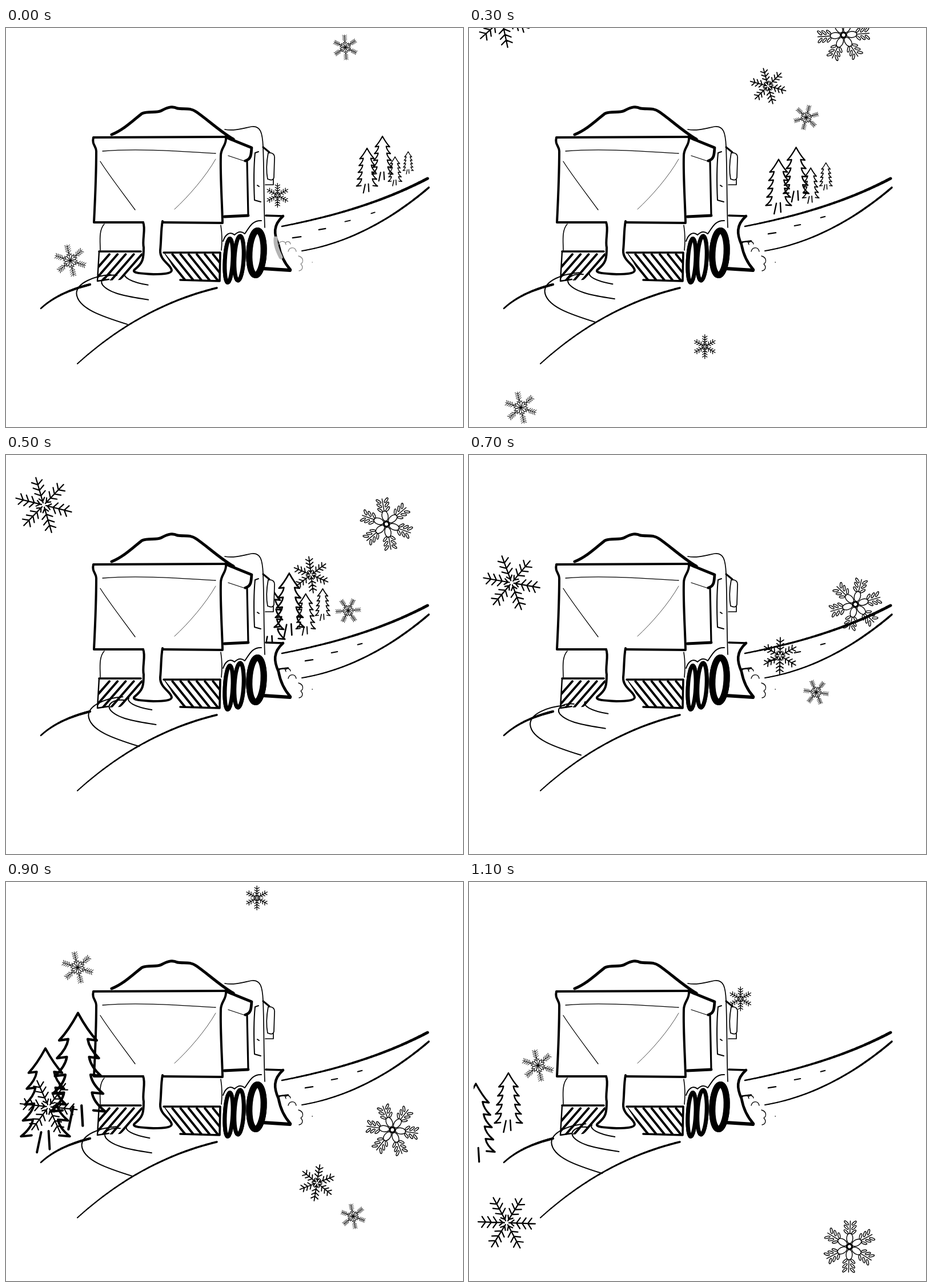
An HTML page with a canvas for the animation above (1200 ms loop, 800x700 px).

```html
<!DOCTYPE html>
<html lang="en">
<head>
<meta charset="utf-8">
<title>Gritting truck in the snow</title>
<style>
  html, body { margin: 0; width: 100%; height: 100%; overflow: hidden; background: #fff; }
  canvas { display: block; }
</style>
</head>
<body>
<canvas id="stage" width="800" height="700"></canvas>
<script>
const ctx = document.getElementById('stage').getContext('2d');
const STEP = 100, STEPS = 12;
const { PI, cos, max } = Math;

// A flake appears at step `born`, falls by speed v and gravity g, and sways sideways once per loop.
const flakes = [
  { kind: 'lace', r: 22, w: .8, born: 0, life: 10, x: 599, y: 34, v: 30.8, g: 3.4, sway: 10, peak: 8, tilt: -4, spin: 6 },
  { kind: 'lace', r: 28, w: .9, born: 8, life: 7, x: 108, y: 64, v: 86, g: 0, sway: 18, peak: 9.5, tilt: -12, spin: 0 },
  { kind: 'plain', r: 21, w: 1.3, born: 9, life: 6, x: 426, y: 28, v: 88.5, g: 0, sway: 51, peak: 11.5, tilt: 0, spin: 0 },
  { kind: 'plain', r: 32, w: 1.8, born: 1, life: 9, x: 534, y: 27, v: 29, g: 4.2, sway: 12, peak: 8, tilt: -23, spin: 4 },
  { kind: 'flower', r: 45, w: 1.4, born: 2, life: 9, x: 666, y: -30, v: 38.4, g: 4, sway: 12, peak: 8, tilt: 44, spin: -18 },
  { kind: 'plain', r: 50, w: 2.2, born: 3, life: 8, x: 66, y: -15, v: 43, g: 4.2, sway: 10, peak: 8, tilt: -12, spin: -2 }
];

// The wood ahead of the truck: x, y, height.
const wood = [[632, 211, 80], [659, 190, 80], [681, 226, 52], [704, 217, 40]];

// Salt arcs: path, then how far each swings sideways and up.
const salt = [
  ['M188 431C160 433 128 445 128 464C130 490 172 504 217 518', 22, 9],
  ['M197 433C176 431 166 441 172 450C185 466 220 471 252 476', 14, 4],
  ['M210 429C205 436 220 445 250 450', 7, 4]
];

const body = 'M153 192L185 187L238 150L292 138L333 147L383 178L430 173Q449 171 450 208L461 218Q471 219 470 230' +
  'L468 275L453 277L455 329H485Q462 350 477 378Q482 405 498 424L375 444H160L165 341H154L158 216Z';

// Line work as width and path.
const truck = [
  [5, 'M185 187C207 178 225 160 238 150C250 145 262 150 272 145C285 138 292 137 300 141C312 143 322 139 333 147C352 160 378 184 398 195'],
  [4, 'M153 192L386 191M153 192C150 205 158 207 158 216C158 260 156 300 154 341M154 341H240M273 341L379 342'],
  [4, 'M385 193C386 206 376 210 376 224C375 260 378 300 379 340'],
  [4.8, 'M386 192C400 198 415 204 430 210C429 220 430 230 419 233M382 331L424 329'],
  [3.2, 'M422 234L424 328M450 209L461 218'],
  [1.3, 'M389 224L419 234M169 216C230 211 300 216 367 220M165 234C180 258 205 290 226 319'],
  [.7, 'M367 230C350 260 320 295 295 318'],
  [1.7, 'M383 178C400 181 415 176 430 173C446 171 449 185 450 208C452 255 451 300 453 350'],
  [1.7, 'M459 219C467 218 471 222 470 230L469 262C468 268 463 267 458 265C455 250 456 235 459 219M468 266V275H454'],
  [2, 'M442 217L436 219C433 250 434 280 435 302L446 305M440 276L443 278'],
  [1.6, 'M172 344C162 355 165 375 165 390M376 346C379 365 378 380 377 390'],
  [3.6, 'M163 392H236M276 394H375M375 394L374 444M305 442L374 444M455 329L485 330'],
  [2.4, 'M163 392L160 444L180 441'],
  [2, 'M380 374C384 362 392 356 400 363C405 358 411 355 418 361C425 352 430 337 447 338'],
  [4.6, 'M485 330C467 346 469 362 477 380C480 396 486 411 498 424'],
  [6, 'M450 422L497 425']
];
const nozzle = 'M240 341C245 352 238 372 241 385C241 405 240 412 225 424C219 430 238 431 258 432C280 432 290 430 290 425C289 415 269 408 270 390C272 370 271 355 274 339';
const puffs = 'M477 380C480 372 489 373 490 380M489 378C491 373 497 374 498 379M494 392C496 384 506 383 508 392' +
  'M512 400C520 402 522 410 516 414C521 419 519 425 513 426M536 411h.4';

const wave = (k, peak, period) => cos((k - peak) * 2 * PI / period);

function stroke(w, d, color = '#000') {
  ctx.lineWidth = w;
  ctx.strokeStyle = color;
  ctx.stroke(new Path2D(d));
}

function fill(d) {
  ctx.fillStyle = '#fff';
  ctx.fill(new Path2D(d));
}

function inside(d, paint) {
  ctx.save();
  ctx.clip(new Path2D(d));
  paint();
  ctx.restore();
}

function ring(x, y, rx, ry, angle = 0) {
  ctx.beginPath();
  ctx.ellipse(x, y, rx, ry, angle, 0, 2 * PI);
  ctx.stroke();
}

function wheel(x, y, rx, ry, w) {
  ctx.fillStyle = '#fff';
  ctx.lineWidth = w;
  ctx.strokeStyle = '#000';
  ring(x, y, rx, ry, .05);
  ctx.fill();
  ring(x, y, rx, ry, .05);
}

// A cubic curve whose width runs from w0 to w1.
function taper(w0, w1, ...p) {
  const point = t => [0, 1].map(j => (1 - t) ** 3 * p[j] + 3 * t * (1 - t) ** 2 * p[j + 2] +
    3 * t * t * (1 - t) * p[j + 4] + t ** 3 * p[j + 6]);
  for (let t = 0; t < 1; t += 1 / 32) stroke(w0 + (w1 - w0) * t, `M${point(t)}L${point(t + 1 / 32)}`);
}

function road() {
  taper(2.6, 5, 483, 348, 575, 330, 660, 305, 738, 264);
  taper(2, 3.6, 518, 391, 595, 378, 670, 340, 740, 280);
  taper(2.6, 4.4, 61, 492, 85, 470, 115, 458, 147, 450);
  taper(2, 3.6, 125, 589, 190, 530, 270, 480, 369, 456);
}

function hatch(x, gap, lean) {
  for (let i = 0; i < 9; i++) stroke(4, `M${x + gap * i} 397l${lean} 46`);
}

function tree(x, y, h) {
  const side = s => {
    let d = 'M0 0';
    for (let i = 1; i < 6; i++) {
      const out = .14 + .018 * i, inner = .07 + .012 * i, b = .08 + .15 * i;
      d += `Q${s * inner * h} ${(b - .08) * h} ${s * out * h} ${b * h}L${s * inner * h} ${(b - .01) * h}`;
    }
    return d;
  };
  ctx.save();
  ctx.translate(x, y);
  stroke(.6 + h * .018, side(1) + side(-1) +
    `M${-.04 * h} ${.79 * h}L${-.08 * h} ${.98 * h}M${.03 * h} ${.78 * h}L${.04 * h} ${.95 * h}`);
  ctx.restore();
}

function farTrees(k) {
  if (k > 6) return;
  wood.forEach(([x, y, h], i) => tree(
    x - (24 * k + 2 * k * k) * (1 - .04 * i),
    y + 11 * k - 1.5 * k * k,
    h * (1 + .055 * k + .006 * k * k)));
}

// One tree after another swings out from behind the truck.
function nearTrees(k) {
  [1, 1, .57].forEach((size, i) => {
    const n = k - 8 - i;
    if (n < 0 || n > 2) return;
    const top = 230 + 62 * n, foot = 438 + 50 * n - 10 * n * n;
    const h = (foot - top) * size;
    tree(126 - 57 * n, top + (1 - size) * 100, h);
  });
}

const barbs = (list, dx, dy) => list.map(d => `M${-dx} ${-d - dy}L0 ${-d}L${dx} ${-d - dy}`).join('');
const arms = {
  plain: w => stroke(w, 'M0 -.08V-1' + barbs([.13], .1, .12) + barbs([.34, .54, .74], .19, .13)),
  lace: w => stroke(w, 'M0 0V-1M0 0L-.17 -.29L0 -.5L.17 -.29Z' + barbs([.3, .5, .62, .74, .86], .16, .12)),
  flower(w) {
    stroke(w, 'M0 -.5V-1');
    ring(0, -.32, .12, .2);
    for (const s of [-1, 1]) for (const d of [.57, .75, .92]) ring(s * .15, -d, .04, .11, s * .8);
  }
};

function flake(f, k) {
  const n = (k - f.born + STEPS) % STEPS;
  if (n > f.life) return;
  ctx.save();
  ctx.translate(f.x + f.sway * wave(k, f.peak, 12), f.y + f.v * n + f.g * n * n);
  ctx.rotate((f.tilt + f.spin * n) * PI / 180);
  ctx.scale(f.r, f.r);
  for (let i = 0; i < 6; i++) {
    arms[f.kind](f.w / f.r);
    ctx.rotate(PI / 3);
  }
  if (f.kind === 'flower') {
    ctx.lineWidth = .07;
    ring(0, 0, .1, .1);
  }
  ctx.restore();
}

function drawTruck() {
  fill(body);
  inside('M163 392H238L240 408L222 426L200 442L160 444Z', () => hatch(181, 14.2, -40));
  inside('M276 394H375L374 444L305 442L288 412Z', () => hatch(263, 14.2, 37));
  truck.forEach(line => stroke(...line));
  fill(nozzle);
  stroke(4, nozzle);
  wheel(390, 408, 6.8, 38.5, 7);
  wheel(408, 404, 8, 39, 7);
  wheel(438.5, 394.5, 12.5, 39, 11);
}

function draw(k) {
  ctx.fillStyle = '#fff';
  ctx.fillRect(0, 0, 800, 700);
  ctx.lineCap = ctx.lineJoin = 'round';

  road();
  farTrees(k);
  drawTruck();

  if (k < 3) stroke(7 - k, 'M472 369C471 381 476 392 481 402', '#b4b4b4');
  stroke(1.3, puffs, k < 3 ? '#888' : '#000');

  // Lane marks move half a gap each step.
  for (let i = 0; i < 4; i++) {
    const x = (k % 2 ? 486 : 509) + 44.5 * i, len = 15 - (x - 500) * .06;
    stroke(2.4 - max(0, x - 500) * .004, `M${x - len / 2} ${531 - x * .32}l${len} -2`);
  }

  const swing = wave(k, 4.3, 6);
  for (const [d, dx, dy] of salt) {
    ctx.save();
    ctx.translate(dx * swing, -dy * swing);
    stroke(2, d);
    ctx.restore();
  }

  inside('M8 0H800V700H8Z', () => nearTrees(k));
  flakes.forEach(f => flake(f, k));
}

const start = performance.now();
function tick() {
  draw(Math.floor((performance.now() - start) / STEP) % STEPS);
  requestAnimationFrame(tick);
}
tick();
</script>
</body>
</html>
```
